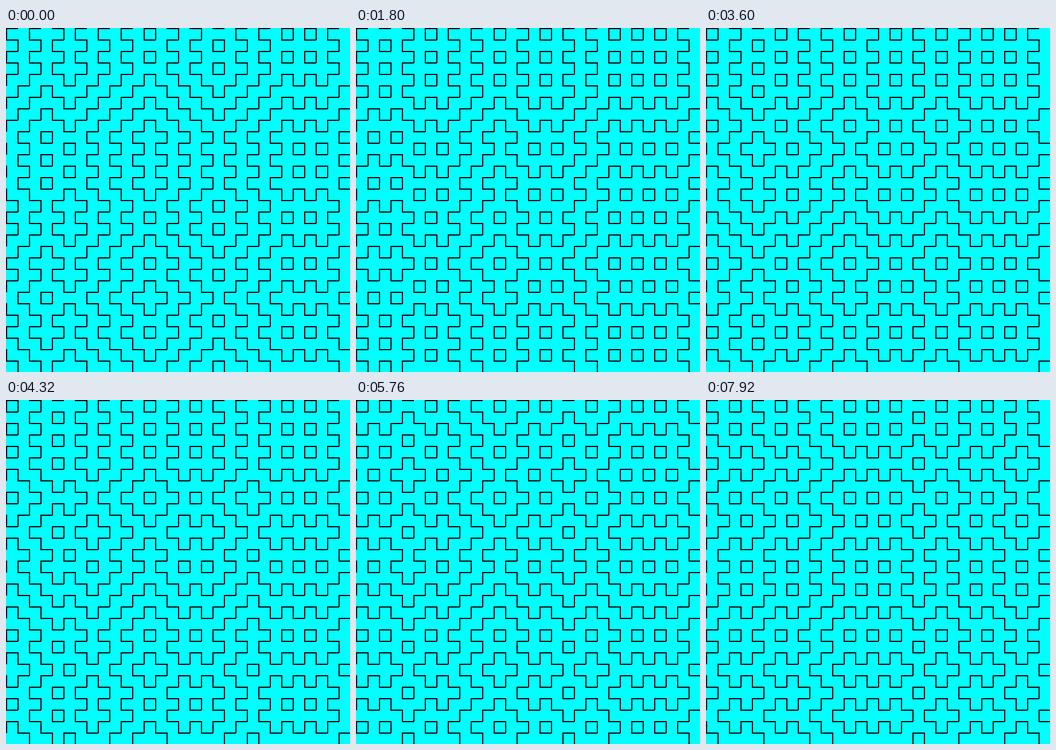
Recreate the animation shown at these times as an HTML page with a canvas. Size 600x600 px, loop 8000 ms.

```html
<!DOCTYPE html>
<html lang="en">
<head>
<meta charset="utf-8">
<title>Stitch pattern</title>
<style>
  html, body { margin: 0; width: 100%; height: 100%; overflow: hidden; background: #0ff; }
  canvas { display: block; }
</style>
</head>
<body>
<canvas id="stage" width="600" height="600"></canvas>
<script>
const ctx = document.getElementById("stage").getContext("2d");
const CELL = 20, COUNT = 30, WEIGHT = 2, STEP = 180, LOOP = 8000;

// Each line is a row of dashes; its bit says whether the first cell is a gap.
const startCols = "010110010101001010110101000001";
const startRows = "000001010111111000010001100010";

// One line shifts per step: a column, then a row, in turn.
const colFlips = [7, 16, 18, 23, 2, 1, 22, 21, 5, 3, 21, 6, 2, 18, 6, 21, 14, 3, 26, 4, 3, 1];
const rowFlips = [5, 12, 28, 15, 22, 17, 14, 29, 9, 14, 11, 22, 6, 27, 2, 29, 16, 2, 6, 28, 4, 11];

function bitsAfter(start, flips, count) {
  const bits = [...start].map(Number);
  flips.slice(0, count).forEach(i => bits[i] ^= 1);
  return bits;
}

function draw(step) {
  const cols = bitsAfter(startCols, colFlips, Math.ceil(step / 2));
  const rows = bitsAfter(startRows, rowFlips, Math.floor(step / 2));
  ctx.fillStyle = "#0ff";
  ctx.fillRect(0, 0, 600, 600);
  ctx.fillStyle = "#000";
  for (let line = 0; line < COUNT; line++) {
    const pos = line * CELL;
    for (let k = cols[line]; k < COUNT; k += 2) ctx.fillRect(pos, k * CELL, WEIGHT, CELL + 1);
    for (let k = rows[line]; k < COUNT; k += 2) ctx.fillRect(k * CELL, pos, CELL + 1, WEIGHT);
  }
}

let shown = -1;
const begin = performance.now();

function tick() {
  const step = Math.floor((performance.now() - begin) % LOOP / STEP);
  if (step !== shown) draw(shown = step);
  requestAnimationFrame(tick);
}
tick();
</script>
</body>
</html>
```
